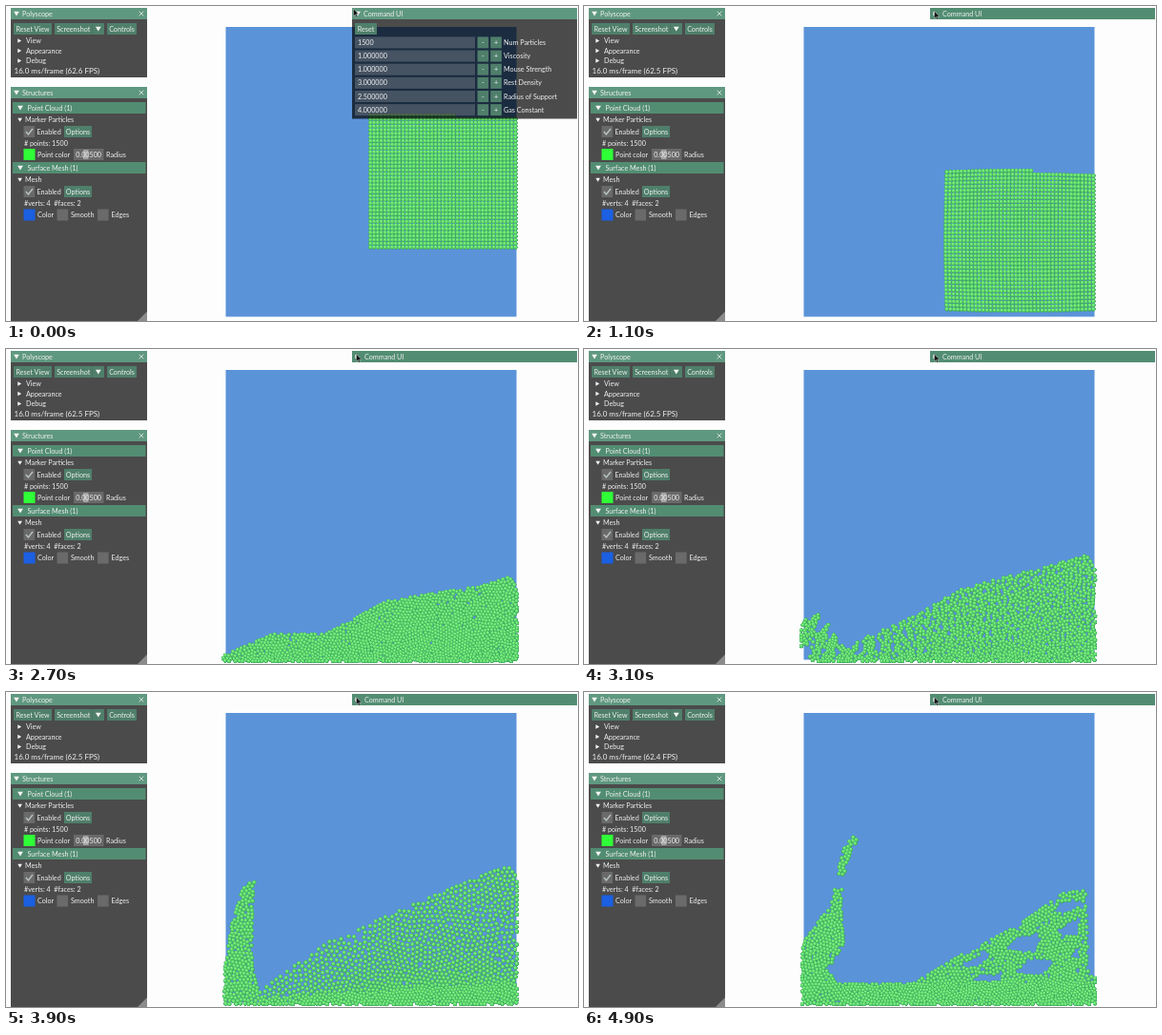
Recreate the animation shown at these times as an HTML page with a canvas. Size 600 by 331 pixels, loop 5000 ms.

```html
<!DOCTYPE html>
<html lang="en">
<head>
<meta charset="utf-8">
<title>Fluid particles</title>
<style>
html, body { margin: 0; width: 100%; height: 100%; overflow: hidden; background: #fdfdfe; }
canvas, svg { position: absolute; left: 0; top: 0; width: 600px; height: 331px; }
text { font: 7.2px Lato, "Open Sans", sans-serif; fill: #f0f0f0; white-space: pre; }
</style>
</head>
<body>
<canvas id="stage" width="600" height="331"></canvas>
<svg id="ui" viewBox="0 0 600 331"></svg>
<script>
const W = 600, H = 331, LOOP = 5000, STEP = 100;
const COLS = 41, ROWS = 37, EXTRA = 24, GRID_ROWS = 10, FLOOR = 328;

// ---------- interface ----------
const TITLE = '#5f9880', BAR = '#528d72', BUTTON = '#4f7f6b', FIELD = 'rgba(200,200,200,.25)';
const box = (x, y, w, h, fill) => `<rect x="${x}" y="${y}" width="${w}" height="${h}" fill="${fill}"/>`;
const label = (x, mid, s, more = '') => `<text x="${x}" y="${mid + 2.6}" ${more}>${s}</text>`;
const centred = (x, mid, s) => label(x, mid, s, 'text-anchor="middle"');
const down = (x, y, r = 2.9) => `<path d="M${x - r} ${y - r * .8}h${2 * r}l${-r} ${r * 1.7}z" fill="#f4f4f4"/>`;
const right = (x, y) => `<path d="M${x - 1.7} ${y - 2.3}v4.6l3.9-2.3z" fill="#f4f4f4"/>`;
const cross = (x, y) => `<path d="M${x - 2.3} ${y - 2.3}l4.6 4.6m0-4.6l-4.6 4.6" stroke="#eee" stroke-width=".8"/>`;
const button = (x, y, w, s) => box(x, y, w, 12, BUTTON) + centred(x + w / 2, y + 6, s);
const check = (x, y, on) => box(x, y, 11.6, 12, FIELD) +
  (on ? `<path d="M${x + 2.4} ${y + 6}l2.5 3 4.6-6" fill="none" stroke="#b9c4c0" stroke-width="1.4"/>` : '');
const panel = (x, y, w, h, s) => box(x, y, w, h, 'rgba(0,0,0,.7)') + box(x, y, w, 12, TITLE) +
  down(x + 6, y + 6) + label(x + 12, y + 6, s);
const section = (y, s) => box(7, y, 139.5, 12, BAR) + down(15, y + 6) + label(22.5, y + 6, s);

// One structure block: bar, tree node, enabled row, counts.
const block = (y, title, node, counts) => section(y, title) + down(14.6, y + 18.7, 2.3) +
  label(20, y + 18.7, node) + check(18.5, y + 25, true) + label(32.5, y + 31, 'Enabled') +
  button(61, y + 25, 29, 'Options') + label(19, y + 43.3, counts);

const stats = panel(5, 2, 143, 73, 'Polyscope') + cross(142, 8) +
  button(8, 18, 40, 'Reset View') + button(51, 18, 39.5, 'Screenshot') +
  box(90.5, 18, 12.5, 12, BUTTON) + down(96.8, 24) + button(106, 18, 31, 'Controls') +
  ['View', 'Appearance', 'Debug'].map((s, k) => right(14, 36.5 + k * 10.5) + label(21, 36.5 + k * 10.5, s)).join('') +
  label(8.5, 68, '', 'id="fps" style="font-size:8px"');

const structures = panel(5, 85, 143, 246, 'Structures') + cross(142, 91) +
  block(101, 'Point Cloud (1)', 'Marker Particles', '# points: 1500') +
  box(18.5, 150, 12, 12, '#2fff37') + label(33, 156, 'Point color') +
  box(71, 150, 31.5, 12, FIELD) + box(81, 151, 5.5, 10, 'rgba(220,220,220,.5)') +
  centred(86.7, 156, '0.00500') + label(105, 156, 'Radius') +
  block(164, 'Surface Mesh (1)', 'Mesh', '#verts: 4  #faces: 2') +
  box(18.5, 213.5, 12, 12, '#1b5fe2') + label(33, 219.5, 'Color') +
  check(53.5, 213.5) + label(68, 219.5, 'Smooth') + check(96, 213.5) + label(110.5, 219.5, 'Edges') +
  '<path d="M148 321v10h-10z" fill="#8b8b8b"/>';

const params = { 'Num Particles': '1500', 'Viscosity': '1.000000', 'Mouse Strength': '1.000000',
  'Rest Density': '3.000000', 'Radius of Support': '2.500000', 'Gas Constant': '4.000000' };
const open = panel(363, 2, 236, 116.5, 'Command UI') + button(366, 18, 23, 'Reset') +
  Object.entries(params).map(([name, value], k) => {
    const y = 32.4 + k * 14.15;
    return box(366, y, 126, 12, FIELD) + label(369, y + 6, value) +
      button(494.5, y, 11.7, '-') + button(508.2, y, 11.7, '+') + label(522, y + 6, name);
  }).join('');
const closed = box(363, 2, 236, 12, BAR) + right(368, 8) + label(376, 8, 'Command UI');

document.getElementById('ui').innerHTML = stats + structures +
  `<g id="open">${open}</g><g id="closed">${closed}</g>` +
  '<path id="cursor" d="M0 0V7.6L1.8 6 3 8.8 4.2 8.2 3 5.6H5.3Z" fill="#111" stroke="#ddd" stroke-width=".4"/>';
const [fps, openUI, closedUI, cursor] = ['fps', 'open', 'closed', 'cursor'].map(id => document.getElementById(id));

// ---------- fluid poses ----------
// hill: surface points; spout: [y, left, right] of the splash at the left wall;
// loose: density near the surface; band: top of the packed layer at both ends.
const POSES = [
  { t: 1.9, loose: .5, band: [318, 312], hill: [[322, 318], [368, 315], [380, 302], [538, 300]] },
  { t: 2.7, loose: .75, band: [323, 323],
    hill: [[227, 323], [280, 300], [335, 300], [400, 265], [500, 249], [528, 240], [536, 252]] },
  { t: 3.5, loose: .55, band: [321, 321],
    hill: [[262, 317], [300, 293], [400, 236], [500, 200], [526, 194], [536, 208]],
    spout: [[237, 245, 257], [243, 236, 244], [280, 231, 245], [328, 228, 266]] },
  { t: 3.9, loose: .42, band: [321, 305],
    hill: [[264, 317], [300, 290], [340, 262], [440, 218], [510, 189], [527, 184], [536, 195]],
    spout: [[200, 256, 267], [208, 248, 259], [245, 237, 258], [290, 230, 258], [328, 229, 268]] },
  { t: 4.9, loose: .7, band: [308, 303], holes: true, gap: [193, 206],
    hill: [[262, 307], [345, 307], [400, 274], [455, 246], [505, 210], [526, 209], [529, 299], [536, 299]],
    spout: [[152, 283, 293], [162, 274, 281], [190, 266, 273], [222, 260, 269], [264, 230, 272], [292, 229, 256], [328, 229, 275]] }
];

let seed = 7;
const rand = () => (seed = seed * 16807 % 2147483647) / 2147483647;
const byX = (a, b) => a.x - b.x;
const clamp = (v, a, b) => Math.min(b, Math.max(a, v));

// Value of the given column at position v along rows sorted by their first number.
function along(rows, v, col = 1) {
  if (v < rows[0][0]) return NaN;
  const k = rows.findIndex(r => r[0] > v);
  if (k < 1) return NaN;
  const a = rows[k - 1], b = rows[k];
  return a[col] + (b[col] - a[col]) * (v - a[0]) / (b[0] - a[0]);
}

function density(pose, x, y) {
  if (y > FLOOR) return 0;
  if (pose.spout && !(pose.gap && y > pose.gap[0] && y < pose.gap[1]) &&
      x >= along(pose.spout, y, 1) && x <= along(pose.spout, y, 2)) return .8;
  const top = along(pose.hill, x);
  if (!(y >= top)) return 0;
  const [l, r] = pose.band;
  if (y > l + (r - l) * (x - 260) / 276) return 1;
  if (pose.holes && y > top + 9 && x < 520 &&
      Math.sin((x - y * .5) / 10) + Math.sin((y + x * .3) / 4.5) > .35) return 0;
  return pose.loose + (1 - pose.loose) * ((y - top) / (FLOOR - top)) ** 5;
}

// Push points apart until neighbours keep the wanted gap.
function relax(points, gap, settle, rounds) {
  const list = points.slice();
  while (rounds--) {
    list.sort(byX);
    for (const p of list) { p.ox = p.x; p.oy = p.y; }
    for (let a = 0; a < list.length; a++) {
      const p = list[a], g = gap(p.ox, p.oy);
      for (let b = a + 1; b < list.length && list[b].ox - p.ox < g; b++) {
        const q = list[b], dx = q.x - p.x, dy = q.y - p.y, d = Math.hypot(dx, dy) || .01;
        if (d >= g) continue;
        const f = (g - d) / d * .3;
        p.x -= dx * f; p.y -= dy * f;
        q.x += dx * f; q.y += dy * f;
      }
    }
    list.forEach(settle);
  }
}

function scatter(n, pose) {
  const at = (x, y) => density(pose, x, y);
  let total = 0;
  for (let y = 140; y <= FLOOR; y++) for (let x = 226; x < 540; x++) total += at(x, y);
  const points = [];
  for (let k = 1; points.length < n; k++) {
    const x = 226 + k * .7548776662 % 1 * 314, y = 140 + k * .569840291 % 1 * 190;
    if (rand() < at(x, y)) points.push({ x, y });
  }
  const gap = (x, y) => Math.min(6, 1.07 * Math.sqrt(total / n / Math.max(.25, at(x, y))));
  relax(points, gap, p => {
    if (!at(p.x, p.y)) { p.x = p.ox; p.y = p.oy; }
  }, 60);
  return points;
}

// Column order; the left splash leans, so its height counts too.
const lean = p => p.x < 300 ? p.x - (327 - p.y) * .5 : p.x;
const firstRow = i => i < EXTRA ? 0 : 1;

function columns(points, height) {
  points.sort((a, b) => lean(a) - lean(b));
  let from = 0;
  return Array.from({ length: COLS }, (_, i) =>
    points.slice(from, from += height(i)).sort((a, b) => a.y - b.y));
}

function falling(i, j, t) {
  const e = Math.min(1, t / 1.1), c = (i - 20) / 20, r = (j - 18) / 18;
  return {
    x: 382.4 + i * 3.8 - e * 1.5 * (1 - c) * (1 - .4 * r * r),
    y: 253.5 + 30 * t + 26.4 * t * t - (36 - j) * (3.85 + .15 * e) + e * 1.5 * r * (1 - c * c)
  };
}

const times = POSES.map(p => p.t);
const poses = POSES.map((pose, k) => k
  ? columns(scatter(1500, pose), i => ROWS - firstRow(i)).flat()
  : columns(scatter(COLS * (ROWS - GRID_ROWS), pose), () => ROWS - GRID_ROWS).flatMap((col, i) => {
      const top = [];
      for (let j = firstRow(i); j < GRID_ROWS; j++) top.push(falling(i, j, pose.t));
      return top.concat(col);
    }));
const cells = [];
for (let i = 0; i < COLS; i++) for (let j = firstRow(i); j < ROWS; j++) cells.push([i, j]);

// Free fall until a particle meets the pile, then it slides to its place there.
function drop(t) {
  const slide = clamp((t - 1.15) / .75, 0, 1);
  return cells.map(([i, j], n) => {
    const p = falling(i, j, t), end = poses[0][n];
    return { x: p.x + (end.x - p.x) * slide, y: t > 1.1 ? Math.min(p.y, end.y) : p.y };
  });
}

// Smooth curve through the poses.
function flow(t) {
  let k = 0;
  while (k < times.length - 2 && t >= times[k + 1]) k++;
  const span = times[k + 1] - times[k], u = (t - times[k]) / span;
  const before = Math.max(0, k - 1), after = Math.min(times.length - 1, k + 2);
  const ma = span / (times[k + 1] - times[before]), mb = span / (times[after] - times[k]);
  const u2 = u * u, u3 = u2 * u;
  const mix = (p, a, b, q) => a * (2 * u3 - 3 * u2 + 1) + b * (3 * u2 - 2 * u3) +
    (b - p) * ma * (u3 - 2 * u2 + u) + (q - a) * mb * (u3 - u2);
  const points = cells.map((_, n) => {
    const [p, a, b, q] = [before, k, k + 1, after].map(m => poses[m][n]);
    return { x: mix(p.x, a.x, b.x, q.x), y: mix(p.y, a.y, b.y, q.y) };
  });
  const wall = p => { p.x = clamp(p.x, 228, 537); p.y = Math.min(p.y, FLOOR); };
  points.forEach(wall);
  if (u > .001 && u < .999) {
    const g = 2.1 + Math.min(1, (t - times[0]) / .8);
    relax(points, () => g, wall, 6);
  }
  return points;
}

// ---------- drawing ----------
const ctx = document.getElementById('stage').getContext('2d');
const ball = document.createElement('canvas');
ball.width = ball.height = 24;
const bctx = ball.getContext('2d');
const shade = bctx.createRadialGradient(9.5, 8, 1, 12, 12, 12);
['#8cf68e', '#6be472', '#55cb66', '#3a9565'].forEach((c, k) => shade.addColorStop(k / 3, c));
bctx.fillStyle = shade;
bctx.arc(12, 12, 11.6, 0, 7);
bctx.fill();

function draw(ms) {
  const t = ms / 1000, shut = ms >= 300, size = 4.8;
  ctx.fillStyle = '#fdfdfe';
  ctx.fillRect(0, 0, W, H);
  ctx.fillStyle = '#5b93d9';
  ctx.fillRect(230.5, 22, 305, 304.5);
  const points = t < times[0] ? drop(t) : flow(t);
  for (const p of points) ctx.drawImage(ball, p.x - size / 2, p.y - size / 2, size, size);

  openUI.style.display = shut ? 'none' : '';
  closedUI.style.display = shut ? '' : 'none';
  const m = Math.min(1, ms / 300);
  cursor.setAttribute('transform', `translate(${364.5 + 3 * m} ${3 + 2.5 * m})`);
  fps.textContent = `16.0 ms/frame (${ms < 600 ? '62.6' : ms < 4600 ? '62.5' : '62.4'} FPS)`;
}

const start = performance.now();
let shown = -1;
function tick() {
  const ms = Math.floor((performance.now() - start) % LOOP / STEP) * STEP;
  if (ms !== shown) draw(shown = ms);
  requestAnimationFrame(tick);
}
tick();
</script>
</body>
</html>
```
